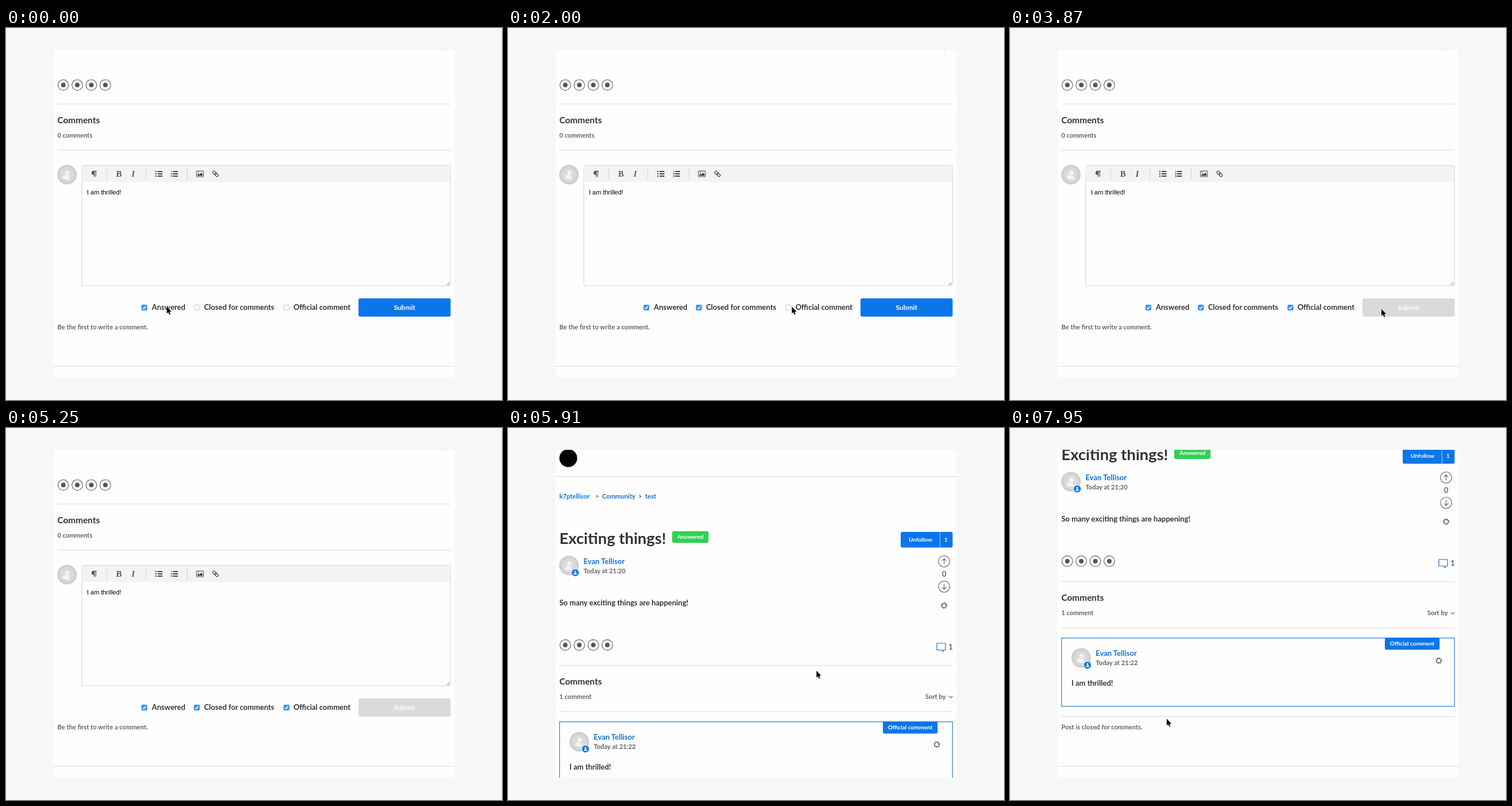
Recreate the animation shown at these times as an HTML page. Size 864x648 px, loop 8000 ms.

```html
<!DOCTYPE html>
<html lang="en">
<head>
<meta charset="utf-8">
<title>Comment thread</title>
<style>
  html, body { margin: 0; width: 100%; height: 100%; overflow: hidden; background: #f7f7f7; }
  svg { display: block; width: 864px; height: 648px; }
  text { font: bold 11.2px Lato, sans-serif; fill: #333; }
  .h1 { font-size: 27.4px; }
  .h2 { font-size: 15.4px; }
  .body { font-size: 13px; }
  .meta { fill: #626262; }
  .link { fill: #1272d2; }
  .small { font-size: 10.2px; fill: #fff; }
  .button { font-size: 12px; fill: #fff; }
  .typed { font: 11px "Liberation Sans", Arial, sans-serif; fill: #000; }
  .serif { font: bold 14.5px "Liberation Serif", serif; fill: #555; }
  .mid { text-anchor: middle; }
  .end { text-anchor: end; }
  .rule { stroke: #d8d8d8; }
  .blue { fill: #0b76ea; }
  .line { fill: none; stroke: #666; stroke-width: 1.2; }

  .step, .tween { animation-duration: 8s; animation-iteration-count: infinite; }
  .step { animation-timing-function: step-end; }
  .tween { animation-timing-function: ease-in-out; }

  #closed { animation-name: closed; }
  #official { animation-name: official; }
  #submit { animation-name: disable; }
  #form { animation-name: leave; }
  #thread { animation-name: enter; }
  #scroll { animation-name: scroll; }
  .dated { animation-name: dated; }
  .today { animation-name: today; }
  #cursor { animation-name: move; }
  #arrow { animation-name: arrow; }
  #hand { animation-name: hand; }

  @keyframes closed { 0% { opacity: 0 } 13%, 100% { opacity: 1 } }
  @keyframes official { 0% { opacity: 0 } 29%, 100% { opacity: 1 } }
  @keyframes disable { 0%, 43.1% { fill: #0b76ea } 45.2%, 100% { fill: #dadada } }
  @keyframes leave { 0% { visibility: visible } 69.75%, 100% { visibility: hidden } }
  @keyframes enter { 0% { visibility: hidden } 69.75%, 100% { visibility: visible } }
  @keyframes dated { 0% { opacity: 1 } 72.5%, 100% { opacity: 0 } }
  @keyframes today { 0% { opacity: 0 } 72.5%, 100% { opacity: 1 } }
  @keyframes scroll {
    0%, 74.4% { transform: translateY(0) }
    79.4%, 100% { transform: translateY(-146px) }
  }
  @keyframes arrow {
    0% { visibility: visible } 35.9% { visibility: hidden } 43.5%, 100% { visibility: visible }
  }
  @keyframes hand {
    0% { visibility: hidden } 35.9% { visibility: visible } 43.5%, 100% { visibility: hidden }
  }
  @keyframes move {
    0%, .5% { transform: translate(280px, 486px) }
    9.9%, 13.5% { transform: translate(333px, 486px) }
    22.9%, 25.1% { transform: translate(494.5px, 486px) }
    28%, 33.25% { transform: translate(489px, 486px); animation-timing-function: ease-in }
    33.3% { transform: translate(489px, 486px); animation-timing-function: linear }
    36.4% { transform: translate(627px, 490px); animation-timing-function: ease-out }
    40%, 52% { transform: translate(647px, 490px); animation-timing-function: ease-in }
    55.1% { transform: translate(785px, 458px) }
    71.9% { transform: translate(785px, 470px); animation-timing-function: ease-out }
    74.4%, 80% { transform: translate(520px, 420px) }
    84.8%, 85.4% { transform: translate(333px, 454.5px) }
    90%, 91.1% { transform: translate(290px, 512px) }
    94.5% { transform: translate(279px, 521px) }
    99.4%, 100% { transform: translate(273px, 507px) }
  }
</style>
</head>
<body>
<svg viewBox="0 0 864 648">
  <defs>
    <clipPath id="card"><rect x="83" y="38" width="698.5" height="570.5"/></clipPath>
    <radialGradient id="shade">
      <stop offset="0" stop-color="#e2e2e2"/><stop offset=".7" stop-color="#d8d8d8"/><stop offset="1" stop-color="#c9c9c9"/>
    </radialGradient>

    <g id="share">
      <circle r="9.3" class="line"/><circle r="4" fill="#555"/>
    </g>
    <g id="shares">
      <use href="#share" x="99.8"/><use href="#share" x="124.2"/>
      <use href="#share" x="148.6"/><use href="#share" x="173"/>
    </g>
    <g id="avatar">
      <circle r="17" fill="url(#shade)"/>
      <g fill="#f4f4f4" transform="rotate(12)">
        <circle cy="-3.5" r="3.6"/><path d="M-6 7.5C-6 2-3 .8 0 .8S6 2 6 7.5Q0 9-6 7.5Z"/>
      </g>
    </g>
    <g id="agent">
      <use href="#avatar"/>
      <circle cx="11" cy="12.5" r="6.6" class="blue" stroke="#fefefe"/>
      <circle cx="11" cy="10.8" r="1.6" fill="#fff"/>
      <path d="M8 15.6Q8 13 11 13T14 15.6Z" fill="#fff"/>
    </g>
    <g id="gear" fill="none" stroke="#666">
      <circle r="3.7" stroke-width="1.5"/>
      <circle r="4.9" stroke-width="1.7" stroke-dasharray="1.7 2.15"/>
    </g>
    <g id="vote" class="line"><circle r="9.8"/><path d="M0 4.8V-4.5M-3.8-.9L0-4.7L3.8-.9"/></g>
    <rect id="box" x="-4.6" y="-4.6" width="9.2" height="9.2" rx="1.8" fill="#fff" stroke="#c6c6c6"/>
    <g id="tick">
      <rect x="-5" y="-5" width="10" height="10" rx="2" fill="#3c8ff0"/>
      <path d="M-2.6.2L-.7 2.3L2.7-2.5" fill="none" stroke="#fff" stroke-width="1.5"/>
    </g>
    <path id="bars" d="M4 -4H12.5M4 0H12.5M4 4H12.5" stroke="#444" stroke-width="1.9"/>
  </defs>

  <rect width="864" height="648" fill="#f7f7f7"/>
  <g clip-path="url(#card)">
    <rect x="83" y="38" width="698.5" height="570.5" fill="#fefefe"/>

    <g id="form" class="step">
      <path d="M758.5 38h2.5" stroke="#777"/>
      <use href="#shares" y="99.3"/>
      <path class="rule" d="M89.5 132.5H774.5M89.5 212.5H774.5M83 589.5H782"/>
      <text x="89.5" y="166.3" class="h2">Comments</text>
      <text x="89.5" y="191" class="meta">0 comments</text>
      <use href="#avatar" x="106.2" y="255.5"/>

      <rect x="132" y="239.5" width="642.3" height="209.5" rx="2" fill="#fefefe" stroke="#d4d4d4"/>
      <path d="M132.5 240H773.8V268.5H132.5Z" fill="#f3f3f3"/>
      <path d="M175.5 244V264M243.5 244V264M315.5 244V264" stroke="#d4d4d4"/>
      <path d="M158 249.5H152.6A2.9 2.9 0 0 0 152.6 255.3H153.6M153.6 249.5V259.3M156.4 249.5V259.3" fill="none" stroke="#555" stroke-width="1.3"/>
      <path d="M153.6 249.5H152.6A2.9 2.9 0 0 0 152.6 255.3H153.6Z" fill="#555"/>
      <text x="196.8" y="259" class="serif mid">B</text>
      <text x="221.7" y="259" class="serif mid" font-style="italic" style="font-style:italic">I</text>
      <use href="#bars" x="260" y="254"/>
      <path d="M260 250h2.2M260 254h2.2M260 258h2.2" stroke="#444" stroke-width="2.2"/>
      <use href="#bars" x="287" y="254"/>
      <path d="M288.7 248.3v3M287.4 253h2v2h-2M287.4 257h2v2.6h-2" fill="none" stroke="#555" stroke-width=".9"/>
      <rect x="331.8" y="249.2" width="12" height="9.8" rx="1" fill="#fff" stroke="#555" stroke-width="1.2"/>
      <path d="M333.4 257.4V255.6L335.5 253.6L337 255L340 251.8L342.3 254.5V257.4Z" fill="#444"/>
      <circle cx="335" cy="251.8" r="1" fill="#444"/>
      <g transform="translate(365 254) rotate(45)" fill="none" stroke="#555" stroke-width="1.4">
        <rect x="-5.8" y="-2.1" width="6.4" height="4.2" rx="2"/><rect x="-.6" y="-2.1" width="6.4" height="4.2" rx="2"/>
      </g>
      <path d="M767.5 448L772.5 443M770.5 448L772.5 446" stroke="#777"/>
      <text x="141" y="290.3" class="typed">I am thrilled!</text>

      <use href="#tick" x="241" y="487"/>
      <use href="#box" x="332.5" y="487"/>
      <use href="#box" x="488.5" y="487"/>
      <g id="closed" class="step"><use href="#tick" x="332.5" y="487"/></g>
      <g id="official" class="step"><use href="#tick" x="488.5" y="487"/></g>
      <text x="254" y="490.7" class="body">Answered</text>
      <text x="345" y="490.7" class="body">Closed for comments</text>
      <text x="500.7" y="490.7" class="body">Official comment</text>
      <rect id="submit" class="tween" x="614" y="471" width="160.5" height="31.7" rx="3"/>
      <text x="694.2" y="490.6" class="button mid">Submit</text>
      <text x="89.5" y="525" class="meta">Be the first to write a comment.</text>
    </g>

    <g id="thread" class="step">
      <g id="scroll" class="tween">
        <circle cx="105" cy="52.5" r="15.5"/>
        <path class="rule" d="M83 84.5H782M89.5 413.5H774.5M89.5 494H774.5M89.5 648.5H774.5M83 735.5H782"/>
        <text x="89.5" y="122.6" class="link">k7ptellisor</text>
        <text x="152" y="122.6" class="meta">&gt;</text>
        <text x="164" y="122.6" class="link">Community</text>
        <text x="227" y="122.6" class="meta">&gt;</text>
        <text x="239" y="122.6" class="link">test</text>

        <text x="89.5" y="202" class="h1">Exciting things!</text>
        <rect x="286" y="179.8" width="63.3" height="20.3" rx="3" fill="#2fd151"/>
        <text x="317.8" y="192.8" class="small mid">Answered</text>
        <rect x="684" y="181" width="90.5" height="27.3" rx="3" class="blue"/>
        <path d="M752.5 181V208.3" stroke="#a9d0fa"/>
        <text x="718.6" y="198" class="small mid">Unfollow</text>
        <text x="763" y="198" class="small mid">1</text>

        <use href="#agent" x="106.2" y="239.6"/>
        <text x="131.5" y="236.5" class="body link">Evan Tellisor</text>
        <text x="131.5" y="252.6" class="meta step dated">October 16, 2016 02:20</text>
        <text x="131.5" y="252.6" class="meta step today">Today at 21:20</text>
        <use href="#vote" x="759.7" y="232.3"/>
        <text x="759.7" y="259.4" class="body meta mid">0</text>
        <use href="#vote" transform="translate(759.7 276.3) rotate(180)"/>
        <use href="#gear" x="759.7" y="309.2"/>
        <text x="89.5" y="309.2" class="body">So many exciting things are happening!</text>

        <use href="#shares" y="378"/>
        <path d="M747 375H762V386.5H758V389.5L754.5 386.5H747Z" fill="none" stroke="#1272d2" stroke-width="1.2"/>
        <text x="774.8" y="385.7" class="body meta end">1</text>
        <text x="89.5" y="447.3" class="h2">Comments</text>
        <text x="89.5" y="472" class="meta">1 comment</text>
        <text x="762.6" y="472" class="meta end">Sort by</text>
        <path d="M768 467L771.2 470L774.4 467" class="line"/>

        <rect x="89.8" y="511.8" width="684.5" height="119" fill="none" stroke="#2b7cd0" stroke-width="1.2"/>
        <path d="M653 511.5H748.3V529.5Q748.3 532.3 745.5 532.3H655.8Q653 532.3 653 529.5Z" class="blue"/>
        <text x="700.7" y="525" class="small mid">Official comment</text>
        <use href="#agent" x="124" y="546.6"/>
        <text x="149.2" y="542.8" class="body link">Evan Tellisor</text>
        <text x="149.2" y="558.9" class="meta step dated">October 16, 2016 02:22</text>
        <text x="149.2" y="558.9" class="meta step today">Today at 21:22</text>
        <use href="#gear" x="747" y="551.3"/>
        <text x="107" y="595" class="body">I am thrilled!</text>
        <text x="89.5" y="671" class="meta">Post is closed for comments.</text>
      </g>
    </g>

    <g id="cursor" class="tween">
      <path id="arrow" class="step" d="M0 -.5V11.4L2.6 9L4.4 13.2L6.5 12.3L4.7 8.2H8.3Z" fill="#000" stroke="#fff" stroke-width=".9" paint-order="stroke"/>
      <path id="hand" class="step" d="M-1.3 7V.2A1.2 1.2 0 0 1 1.1 .2V4.2Q2.4 3.4 3.3 4.6Q4.8 4 5.4 5.2Q7 4.8 7 6.4V8.6Q6.6 10.5 5.8 12H-.5Q-1.5 9.8-3.6 7.3Q-3.2 5.6-1.3 7Z" fill="#fff" stroke="#000"/>
    </g>
  </g>
</svg>
</body>
</html>
```
